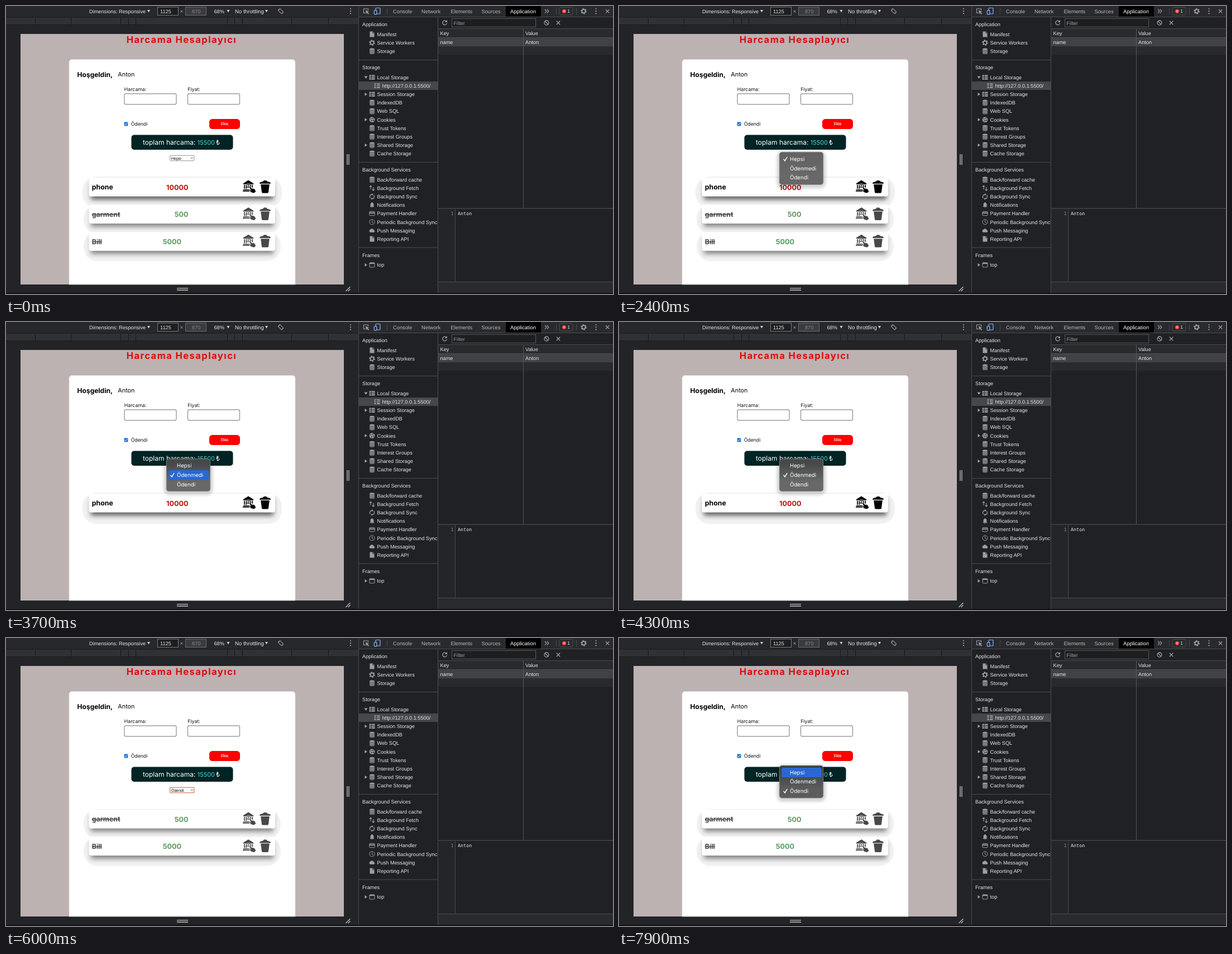
Write an HTML page that moves like this. It is 1087x515 px and loops after 8000 ms.

```html
<!DOCTYPE html>
<html lang="tr">
<head>
<meta charset="utf-8">
<title>Harcama Hesaplayıcı</title>
<style>
html, body { margin: 0; width: 100%; height: 100%; overflow: hidden; background: #202124; }
svg { display: block; position: absolute; left: 0; top: 0; }
text { font-family: "Liberation Sans", Arial, sans-serif; text-rendering: geometricPrecision; white-space: pre; }
.ui { font-family: Inter, sans-serif; }
.mono { font-family: "DejaVu Sans Mono", monospace; }
.strike { text-decoration: line-through; }
</style>
</head>
<body>
<svg id="stage" width="1087" height="515" viewBox="0 0 1087 515"></svg>
<script>
const LIGHT = '#e3e5e8', ICON = '#9aa0a6', LINE = '#4a4c50';
const USER = 'Anton';

// y is the middle of the capitals
const text = (x, y, str, size = 9.2, fill = LIGHT, attrs = '') =>
  `<text x="${x}" y="${y + size * 0.36}" font-size="${size}" fill="${fill}" ${attrs}>${str}</text>`;
const rect = (x, y, w, h, fill, attrs = '') =>
  `<rect x="${x}" y="${y}" width="${w}" height="${h}" fill="${fill}" ${attrs}/>`;
const path = (d, stroke, width = 1, attrs = '') =>
  `<path d="${d}" fill="none" stroke="${stroke}" stroke-width="${width}" ${attrs}/>`;
const shape = (d, fill, attrs = '') => `<path d="${d}" fill="${fill}" ${attrs}/>`;
const at = (x, y, body, attrs = '') => `<g transform="translate(${x} ${y})" ${attrs}>${body}</g>`;
const dots = x => [5, 9.2, 13.4].map(y => `<circle cx="${x}" cy="${y}" r="1.1" fill="${ICON}"/>`).join('');
const caret = (x, y) => shape(`M${x} ${y - 2}h5l-2.5 4.6z`, '#d0d2d5');

// Icons are drawn around their own centre
const icons = {
  doc: shape('M-4-5H1.5L4-2.2V5H-4z', ICON) + path('M1.2-5v3H4', '#202124', 0.8),
  gear: `<circle r="3.2" fill="none" stroke="${ICON}" stroke-width="1.9"/>` +
    `<circle r="4.5" fill="none" stroke="${ICON}" stroke-width="1.7" stroke-dasharray="2.1 2.61"/>`,
  db: shape('M-4.5-3.4a4.5 1.9 0 0 1 9 0V3.4a4.5 1.9 0 0 1-9 0z', ICON) +
    path('M-4.5-2.5q4.5 2.6 9 0M-4.5.2q4.5 2.6 9 0M-4.5 2.8q4.5 2.6 9 0', '#202124', 0.8),
  table: rect(-5, -4.2, 10, 8.4, ICON) + path('M-5-1.5H5M-5 1.3H5M-1.2-4.2V4.2', '#202124', 0.9),
  cookie: `<circle r="4.8" fill="${ICON}"/>` +
    [[-2, -1.5], [1.5, -2.4], [-1, 2], [2.2, 1.2], [4, -4]].map(([x, y]) =>
      `<circle cx="${x}" cy="${y}" r="1.1" fill="#202124"/>`).join(''),
  arrows: path('M-2.5 2V-4M-4.6-2.2L-2.5-4.4-.4-2.2M2.3-2V4M.2 2.2L2.3 4.4 4.4 2.2', ICON, 1.2),
  sync: path('M-3 2.6A3.8 3.8 0 0 1 0-3.8M3-2.6A3.8 3.8 0 0 1 0 3.8', ICON, 1.3) +
    shape('M-.3-6V-1.6L2.2-3.8zM.3 6V1.6L-2.2 3.8z', ICON),
  bell: shape('M-4 3.2L-2.9 1.8V-1.2a2.9 2.9 0 0 1 2-2.9a.9.9 0 0 1 1.8 0a2.9 2.9 0 0 1 2 2.9V1.8L4 3.2zM-1.1 4h2.2q-1.1 1.6-2.2 0', ICON),
  card: rect(-4.6, -3.6, 9.2, 7.2, 'none', `rx="1" stroke="${ICON}"`) + rect(-4.6, -2, 9.2, 2, ICON),
  clock: `<circle r="4.5" fill="none" stroke="${ICON}"/>` + path('M0-3V.3L2.2 1.6', ICON),
  cloud: shape('M-3 3.4A2.4 2.4 0 0 1-3.2-1.3A3.4 3.4 0 0 1 3-.9A2.2 2.2 0 0 1 3 3.4z', ICON),
  frame: rect(-4.5, -4, 9, 8, 'none', `rx="1" stroke="${ICON}"`) + rect(-4.5, -4, 9, 2.2, ICON)
};

function deviceBar() {
  const ticks = [53, 117, 206, 220, 233, 397, 410, 424, 512, 578];
  return rect(0, 0, 631, 515, '#232427') + rect(0, 0, 631, 19.5, '#27282b') +
    text(149, 9.5, 'Dimensions: Responsive') + caret(253, 9) +
    rect(271.5, 2, 37, 14.5, '#1d1e20', 'stroke="#77797d"') + text(276, 9.5, '1125') +
    text(311.5, 9.5, '×', 10, ICON) +
    rect(321.5, 2, 37, 14.5, '#3a3b3e', 'stroke="#6a6c70"') + text(333, 9.5, '870', 9.2, '#85888c') +
    text(372.5, 9.5, '68%') + caret(395.5, 9) +
    text(410, 9.5, 'No throttling', 9.6) + caret(464, 9) +
    at(492, 9.3, rect(-2.3, -4, 4.6, 8, 'none', `rx=".8" stroke="${ICON}" transform="rotate(-45)"`) +
      path('M-4.8-.8A4.8 4.8 0 0 1-1-4.8M4.8.8A4.8 4.8 0 0 1 1 4.8', ICON, 0.9)) +
    dots(617) +
    rect(0, 20, 631, 13.5, '#303134') + path('M0 20H631M0 33.5H631', '#191a1c', 1) +
    path(ticks.map(x => `M${x - 0.5} 21V33`).join(''), '#17181a', 1) +
    path('M611 265V284M614 265V284', '#c3c5c8', 1.3) +
    path('M306 504.7H326M306 508H326', '#c3c5c8', 1.3) +
    path('M608.5 510L616.5 502M612.5 510L616.5 506', '#c3c5c8', 1.2);
}

function page() {
  const ui = 'class="ui"', field = 'rx="2.5" stroke="#8b8b8b" stroke-width="1.2"';
  return rect(26, 50, 579, 448, '#bcb2b2') +
    text(215.7, 60, 'Harcama Hesaplayıcı', 16.6, '#e30a0a', 'class="ui" font-weight="700" letter-spacing="1.4"') +
    shape('M113 498V100.5a5 5 0 0 1 5-5H513a5 5 0 0 1 5 5V498z', '#fff', 'stroke="#d9d5d5" stroke-width=".8"') +
    text(127.6, 122.5, 'Hoşgeldin,', 12, '#000', 'class="ui" font-weight="700"') +
    text(200.3, 122.5, USER, 10.8, '#000', ui) +
    text(211.7, 149, 'Harcama:', 8.8, '#111', ui) + text(325.3, 149, 'Fiyat:', 8.8, '#111', ui) +
    rect(212, 156.8, 93, 19, '#fff', field) + rect(325.5, 156.8, 93, 19, '#fff', field) +
    rect(211.6, 207.6, 6.8, 6.8, '#1a73d8', 'rx="1"') + path('M213 211l1.4 1.5 2.7-3.2', '#fff', 1) +
    text(223.7, 210.7, 'Ödendi', 8.7, '#111', ui) +
    rect(364, 202, 55, 18, '#fe0000', 'rx="5.5"') +
    text(391.5, 210.7, 'Ekle', 7, '#fff', 'text-anchor="middle" stroke="#fff" stroke-width=".15"') +
    rect(224.5, 230.5, 182, 26.5, '#002324', 'rx="5"') +
    text(245, 243.7, 'toplam harcama:', 12, '#fff', ui) +
    text(342.8, 243.7, '15500', 10.9, '#4fd6d8', ui) + text(376, 243.7, '₺', 12, '#fff', ui) +
    rect(293.8, 267.3, 43, 9.4, '#fff', 'id="select" rx="1"') +
    text(296, 272, '', 7, '#000', 'id="label"') + path('M331 271l1.8 1.8 1.8-1.8', '#333', 0.9);
}

function bank(c) {
  return shape('M-1 5.5L8.2-.2 17.4 5.5V7H-1z', c) +
    path('M1.2 8v7M4.4 8v7M12.2 8v7M15.4 8v5', c, 1.7) + rect(-1, 16, 12, 1.6, c) + rect(-1.8, 18.2, 12, 1.7, c) +
    '<circle cx="8.3" cy="9.5" r="4" fill="#fff"/>' +
    `<circle cx="8.3" cy="9.5" r="3.1" fill="none" stroke="${c}" stroke-width="1.1"/>` + rect(7.7, 7.3, 1.3, 4.5, c) +
    shape('M9.5 11.3q1.4-1.2 2.5.4l2 2.5 5.2.8 2.7 4.8-3.4 3.2-5.5-1.4-3.6-4.2q.3-1.3 1.8-.4l1.2.8z', c, 'stroke="#fff" stroke-width=".7"');
}

const trash = c => shape('M2.2 7H17.8L16 21q-.2 1.4-1.8 1.4H5.8Q4.2 22.4 4 21z', c) +
  shape('M0 5.8Q.2 2.8 3.6 2.6L6.4 1.8Q7 0 8.4 0h3.2Q13 0 13.6 1.8l2.8.8Q19.8 2.8 20 5.8z', c);

function expense(id, name, price, priceX, paid) {
  const c = paid ? '#484848' : '#000', inset = paid ? 2 : 0;
  return `<g id="${id}">` +
    rect(137 + inset, 305 + inset / 2, 357 - 2 * inset, 56 - inset * 1.5, '#f1f1f1', 'rx="25"') +
    rect(152, 316, 327, 30, '#000', `opacity="${paid ? 0.45 : 0.6}" filter="url(#soft)"`) +
    rect(148.5, 307, 333.5, 33.5, '#fff', 'rx="4"') +
    text(153.8, 324, name, 12.3, c, `class="ui${paid ? ' strike' : ''}" font-weight="700"`) +
    text(priceX, 324, price, 12.6, paid ? '#5c9a60' : '#c30d0d', 'class="ui" font-weight="700"') +
    at(425.8, 311.8, bank(c)) + at(454, 312, trash(c)) + '</g>';
}

function sidebar() {
  const entry = (y, icon, label, depth = 0, mark = '') =>
    at(655.5 + depth, y, icons[icon]) + text(664.5 + depth, y, label) +
    (mark === 'v' ? shape(`M641.5 ${y - 2}h6l-3 4.4z`, ICON) : '') +
    (mark === '>' ? shape(`M642.5 ${y - 3}v6l4.4-3z`, ICON) : '');
  const list = (y, rows) => rows.map((r, i) => entry(y + i * 15.15, ...r)).join('');
  return rect(631, 0, 143, 515, '#202124') + rect(632, 135, 141, 15, '#46474a') +
    path('M632 96.5H773M632 279.5H773M632 432H773', LINE) +
    text(638, 33, 'Application') +
    list(50.5, [['doc', 'Manifest'], ['gear', 'Service Workers'], ['db', 'Storage']]) +
    text(638, 110, 'Storage') +
    list(127.5, [['table', 'Local Storage', 0, 'v'], ['table', 'http://127.0.0.1:5500/', 9],
      ['table', 'Session Storage', 0, '>'], ['db', 'IndexedDB'], ['db', 'Web SQL'],
      ['cookie', 'Cookies', 0, '>'], ['db', 'Trust Tokens'], ['db', 'Interest Groups'],
      ['db', 'Shared Storage', 0, '>'], ['db', 'Cache Storage']]) +
    text(638, 293, 'Background Services') +
    list(310.5, [['db', 'Back/forward cache'], ['arrows', 'Background Fetch'], ['sync', 'Background Sync'],
      ['bell', 'Notifications'], ['card', 'Payment Handler'], ['clock', 'Periodic Background Sync'],
      ['cloud', 'Push Messaging'], ['doc', 'Reporting API']]) +
    text(638, 445.5, 'Frames') + entry(463, 'frame', 'top', 0, '>');
}

function storage() {
  return rect(773, 20, 314, 495, '#202124') +
    path('M773.5 20V513', LINE) +
    path('M788.6 27.4A3.8 3.8 0 1 0 789.5 30.5', ICON, 1.3) + shape('M789.8 25v4h-4z', ICON) +
    rect(798.5, 22.5, 150, 15, '#1d1e20', 'stroke="#55575b"') + text(801.5, 30.3, 'Filter', 9.2, '#9a9da1') +
    `<circle cx="968" cy="30" r="4" fill="none" stroke="${ICON}" stroke-width="1.3"/>` +
    path('M965.2 27.2l5.6 5.6M985.8 26.8l6.4 6.4M992.2 26.8l-6.4 6.4', ICON, 1.3) +
    rect(774, 41, 313, 15.5, '#292a2d') + rect(774, 57, 313, 15.5, '#414245') + rect(774, 72.5, 313, 15, '#292a2d') +
    path('M774 40.5H1087M774 56.5H1087', LINE) + path('M926.5 41V361M774 362H1087', '#55575a') +
    text(777.5, 48.8, 'Key') + text(930, 48.8, 'Value') + text(777.5, 64.8, 'name') + text(930, 64.8, USER) +
    rect(774, 363, 30, 130, '#242528') + path('M804.5 363V493', LINE) +
    text(796.5, 370.5, '1', 8.4, '#8a8d91', 'class="mono"') + text(809, 370.5, USER, 8.4, LIGHT, 'class="mono"') +
    rect(774, 493, 313, 20, '#292a2d') + path('M774 493.5H1087', LINE);
}

function tabs() {
  return rect(631, 0, 456, 19.5, '#292a2d') + path('M631 19.5H1087', LINE) + path('M631.5 0V513', '#48494d') +
    rect(895, 0, 63, 19, '#000') +
    path('M644 12.5h-3.5V5h8v3', ICON, 1.1) + shape('M644 7.5l6.2 2.6-2.6 1 2.6 2.7-1.2 1.1-2.6-2.7-1.2 2.2z', ICON) +
    rect(662, 3.5, 8, 10.5, 'none', 'rx="1" stroke="#8ab4f8" stroke-width="1.2"') +
    rect(659.3, 7.8, 4.5, 7, '#292a2d', 'rx=".7" stroke="#8ab4f8" stroke-width="1.2"') +
    path('M682.5 4V15', LINE) +
    [[693, 'Console'], [744, 'Network'], [796.5, 'Elements'], [851.5, 'Sources']].map(([x, s]) => text(x, 9.5, s, 9.3, '#b4b8bd')).join('') +
    text(903, 9.5, 'Application', 9.4, '#fff') +
    path('M965 6l3 3.3-3 3.3M968.8 6l3 3.3-3 3.3', ICON, 1.2) + path('M985.5 4V15M1021.5 4V15', LINE) +
    rect(991, 2.5, 24, 13.5, 'none', `rx="2" stroke="${LINE}"`) +
    '<circle cx="999.5" cy="9.3" r="3.6" fill="#e04a3f"/>' + path('M998.2 8l2.6 2.6M1000.8 8l-2.6 2.6', '#fff', 0.9) +
    text(1005.3, 9.3, '1', 8.5) + at(1034.5, 9.3, icons.gear) + dots(1056.5) +
    path('M1074 6.2l6.2 6.2M1080.2 6.2l-6.2 6.2', ICON, 1.3);
}

const ROW = 16.6, OPTIONS = ['Hepsi', 'Ödenmedi', 'Ödendi'];
const SHADES = [['#636363', '#686868'], ['#45494a', '#686868'], ['#394142', '#5c5c5c']];

function menu() {
  const mid = i => 12.6 + i * ROW;
  return '<g id="menu">' +
    rect(-4.5, -1, 88, 66, '#000', 'rx="10" opacity=".16" filter="url(#halo)"') +
    rect(0.3, 0.3, 78.4, 58, 'url(#shade)', 'rx="4.5" stroke="#858585" stroke-width=".9"') +
    rect(4, 0, 72, 17, '#2a67d3', 'id="mark" rx="3.5"') +
    OPTIONS.map((s, i) => text(19, mid(i), s, 9.7, '#fff', 'class="ui"')).join('') +
    path('M8 .4l2.1 2.7L14-3.4', '#fff', 1.4, 'id="tick" stroke-linecap="round"') + '</g>';
}

const stage = document.getElementById('stage');
stage.innerHTML = `<defs>
  <filter id="soft" x="-10%" y="-60%" width="120%" height="220%"><feGaussianBlur stdDeviation="4"/></filter>
  <filter id="halo" x="-20%" y="-20%" width="140%" height="140%"><feGaussianBlur stdDeviation="2.6"/></filter>
  <linearGradient id="shade" x2="0" y2="1"><stop id="shadeA" offset=".15"/><stop id="shadeB" offset=".7"/></linearGradient>
  </defs>` + deviceBar() + page() +
  expense('phone', 'phone', '10000', 287, false) +
  expense('garment', 'garment', '500', 301.7, true) +
  expense('bill', 'Bill', '5000', 280.7, true) +
  sidebar() + storage() + tabs() + menu() + rect(0, 513.5, 1087, 1.5, '#0c0c0d');

const $ = id => document.getElementById(id);
const SLOTS = [{ phone: 0, garment: 1, bill: 2 }, { phone: 0 }, { garment: 0, bill: 1 }];

// time, list filter, checked option, marked option (-1 none), menu opacity
const STEPS = [
  [0, 0, 0, -1, 0],
  [1500, 0, 0, 0, 1],
  [2000, 0, 0, 1, 1],
  [2400, 0, 0, -1, 1],
  [2500, 0, 0, 1, 1],
  [2600, 0, 0, 1, 0.75],
  [2700, 1, 0, 1, 0.3],
  [2800, 1, 1, -1, 0],
  [3700, 1, 1, 1, 1],
  [4000, 1, 1, 2, 1],
  [4300, 1, 1, -1, 1],
  [5100, 1, 1, 2, 1],
  [5800, 1, 1, 2, 0.75],
  [5900, 2, 1, 2, 0.3],
  [6000, 2, 2, -1, 0],
  [6900, 2, 2, 2, 1],
  [7300, 2, 2, 1, 1],
  [7400, 2, 2, 0, 1],
  [7800, 2, 2, -1, 1],
  [7900, 2, 2, 0, 1]
];

function show([, filter, checked, marked, opacity]) {
  for (const id of ['phone', 'garment', 'bill']) {
    const slot = SLOTS[filter][id];
    $(id).style.display = slot === undefined ? 'none' : '';
    $(id).setAttribute('transform', `translate(0 ${(slot || 0) * 48.6})`);
  }
  $('label').textContent = OPTIONS[filter];
  $('select').setAttribute('stroke', filter ? '#c8683c' : '#777');
  $('select').setAttribute('stroke-width', filter ? 1.1 : 0.8);
  $('menu').style.opacity = opacity;
  $('menu').setAttribute('transform', `translate(287 ${261 - checked * ROW})`);
  $('shadeA').setAttribute('stop-color', SHADES[checked][0]);
  $('shadeB').setAttribute('stop-color', SHADES[checked][1]);
  $('tick').setAttribute('transform', `translate(0 ${12.8 + checked * ROW})`);
  $('mark').style.display = marked < 0 ? 'none' : '';
  $('mark').setAttribute('y', 4.1 + Math.max(marked, 0) * ROW);
}

const start = performance.now();
let current;
function tick() {
  const t = (performance.now() - start) % 8000;
  const step = STEPS.findLast(s => s[0] <= t);
  if (step !== current) show(current = step);
  requestAnimationFrame(tick);
}
tick();
</script>
</body>
</html>
```
